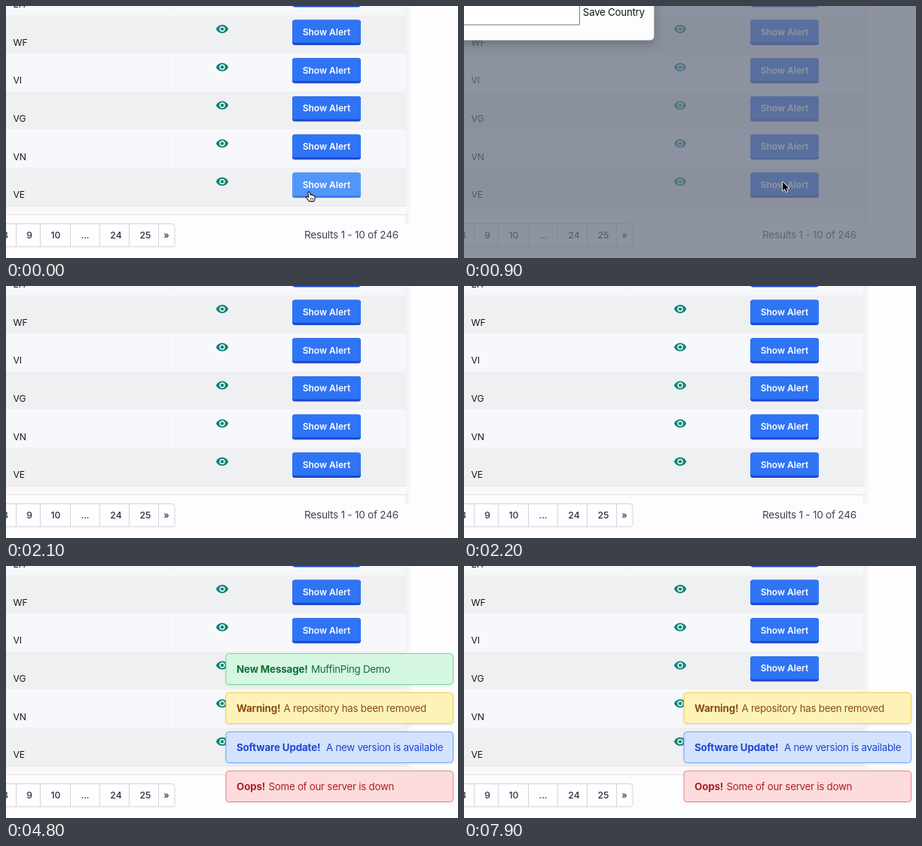
Animation of 600x335 px, one loop 8 s. Source, as an HTML page with a canvas:

```html
<!DOCTYPE html>
<html lang="en">
<head>
<meta charset="utf-8">
<title>Table with alerts</title>
<style>
  html, body { margin: 0; width: 100%; height: 100%; overflow: hidden; background: #fdfcfe; }
  canvas { display: block; width: 600px; height: 335px; }
</style>
</head>
<body>
<canvas id="stage"></canvas>
<script>
const W = 600, H = 335, LOOP = 8000, STEP = 100;
const ROW = 50.7, TABLE_TOP = 12.3;
const canvas = document.getElementById('stage');
const ctx = canvas.getContext('2d');
const ratio = window.devicePixelRatio || 1;
canvas.width = W * ratio;
canvas.height = H * ratio;

const CODES = ['EH', 'WF', 'VI', 'VG', 'VN', 'VE'];
const PAGES = [['8', -1], ['9', 31], ['10', 66], ['...', 105], ['24', 146], ['25', 185], ['»', 213]];
const DIVIDERS = [13.5, 45.5, 85.5, 124.5, 163.5, 202.5];

const ALERTS = [
  { title: 'New Message!', body: 'MuffinPing Demo', x: 405, start: 2400, end: 5900,
    fill: '#d5f7e1', edge: '#6fdc97', ink: '#166b39' },
  { title: 'Warning!', body: 'A repository has been removed', x: 368.5, start: 2600, end: Infinity,
    fill: '#fdf3b9', edge: '#f5cd45', ink: '#8a4d14' },
  { title: 'Software Update!', body: 'A new version is available', x: 425, start: 2800, end: Infinity,
    fill: '#d4e3fd', edge: '#6ca4f5', ink: '#1f46cf' },
  { title: 'Oops!', body: 'Some of our server is down', x: 348.5, start: 4000, end: Infinity,
    fill: '#fcdcdd', edge: '#f48383', ink: '#ae2024' }
];

// Cursor stops: time, x, y
const PATH = [
  [0, 402, 247], [200, 402, 247], [600, 423, 234], [1000, 423, 234],
  [1500, 209, 6], [1800, 209, 6], [2000, 200, -40]
];

const clamp = v => Math.max(0, Math.min(1, v));
const span = (t, from, length) => clamp((t - from) / length);
const easeOut = p => 1 - (1 - p) * (1 - p);
const smooth = p => p * p * (3 - 2 * p);
const mix = (a, b, p) => a + (b - a) * p;

function rect(x, y, w, h, color) {
  ctx.fillStyle = color;
  ctx.fillRect(x, y, w, h);
}

function rounded(x, y, w, h, r, fill, edge) {
  ctx.beginPath();
  ctx.roundRect(x, y, w, h, r);
  if (fill) {
    ctx.fillStyle = fill;
    ctx.fill();
  }
  if (edge) {
    ctx.strokeStyle = edge;
    ctx.lineWidth = 1;
    ctx.stroke();
  }
}

function text(str, x, y, size, color, { weight = 400, align = 'left', gap = 0 } = {}) {
  ctx.font = `${weight} ${size}px Inter, "Open Sans", sans-serif`;
  ctx.letterSpacing = gap + 'px';
  ctx.textAlign = align;
  ctx.fillStyle = color;
  ctx.fillText(str, x, y);
}

function shadow(color, blur, y) {
  ctx.shadowColor = color;
  ctx.shadowBlur = blur * ratio;
  ctx.shadowOffsetY = y * ratio;
}

function clearShadow() {
  shadow('transparent', 0, 0);
}

function dot(x, y, r, color) {
  ctx.beginPath();
  ctx.arc(x, y, r, 0, Math.PI * 2);
  ctx.fillStyle = color;
  ctx.fill();
}

function eye(x, y) {
  ctx.beginPath();
  ctx.moveTo(x - 8.2, y);
  ctx.bezierCurveTo(x - 5, y - 7.4, x + 5, y - 7.4, x + 8.2, y);
  ctx.bezierCurveTo(x + 5, y + 7.4, x - 5, y + 7.4, x - 8.2, y);
  ctx.fillStyle = '#0d8578';
  ctx.fill();
  dot(x, y, 3.7, '#f6f8fa');
  dot(x, y, 2.2, '#0d8578');
}

function button(y, hover) {
  rounded(380, y, 91, 33.5, 3.5, hover ? '#3b7ff0' : '#1c48d3');
  rounded(380, y, 91, 30.5, [3.5, 3.5, 2, 2], hover ? '#5396f9' : '#2f74f4');
  text('Show Alert', 425.5, y + 20.3, 12, '#fff', { weight: 600, align: 'center' });
}

function table(hover) {
  const edge = ctx.createLinearGradient(530, 0, 539, 0);
  edge.addColorStop(0, '#f0f0f4');
  edge.addColorStop(1, '#fdfcfe');
  rect(530, 0, 9, 289, edge);
  rect(0, 266, 532, 11, '#fdf9fb');
  CODES.forEach((code, i) => {
    const y = TABLE_TOP + (i - 1) * ROW;
    rect(0, y, 530, ROW, i % 2 ? '#eff0f2' : '#f7f8fb');
    if (i % 2 === 0) rect(215, y, 1, ROW, '#f0f1f5');
    text(code, 9.5, y + 40.3, 12.2, '#17181c', { gap: -0.1 });
    eye(287, y + 18.3);
    button(y + 6.3, hover && i === CODES.length - 1);
  });
  rect(0, 265.5, 531, 1, '#e5e1e4');
  rect(0, 277, 533, 1, '#e6e3e8');
}

function footer() {
  rounded(-20, 289.5, 244, 30.5, 4, '#fefdff', '#d3d4da');
  DIVIDERS.forEach(x => rect(x - 0.5, 290, 1, 30, '#d3d4da'));
  PAGES.forEach(([label, x]) =>
    text(label, x, 309, 12.2, '#2b303a', { weight: 500, align: 'center' }));
  text('Results 1 - 10 of 246', 396, 309.2, 13.6, '#3d4451', { gap: -0.25 });
}

function dialog(shown) {
  if (shown <= 0) return;
  ctx.save();
  ctx.globalAlpha = shown * 0.75;
  rect(0, 0, W, H, '#686f80');
  ctx.globalAlpha = shown;
  ctx.translate(-40, 5);
  ctx.scale(0.95 + 0.05 * shown, 0.95 + 0.05 * shown);
  ctx.translate(40, -5);
  shadow('rgba(0,0,0,.22)', 14, 5);
  rounded(-340, -200, 592.5, 245.5, 5, '#fff');
  clearShadow();
  rounded(-300, -15.5, 453.5, 40.5, 0, '#fff', '#74767b');
  text('Save Country', 158, 13, 13.3, '#111216', { gap: -0.25 });
  ctx.restore();
}

function alerts(t) {
  let y = 272.5;
  for (const a of [...ALERTS].reverse()) {
    if (t < a.start) continue;
    const out = span(t, a.end, 300);
    if (out < 1) {
      ctx.save();
      ctx.globalAlpha = mix(0.4, 1, span(t, a.start, 150)) * (1 - out);
      ctx.translate(out * 40, 0);
      shadow('rgba(40,40,60,.12)', 4, 1);
      rounded(292, y, 301.5, 41, 4, a.fill);
      clearShadow();
      rounded(292, y, 301.5, 41, 4, null, a.edge);
      text(a.title, 306, y + 25.7, 13.3, a.ink, { weight: 700, gap: -0.12 });
      text(a.body, a.x, y + 25.7, 13.3, a.ink, { gap: -0.25 });
      ctx.restore();
    }
    y -= 52;
  }
}

function polygon(points, fill, edge, width) {
  ctx.beginPath();
  points.forEach(([x, y]) => ctx.lineTo(x, y));
  ctx.closePath();
  ctx.lineJoin = 'round';
  ctx.lineWidth = width;
  ctx.strokeStyle = edge;
  ctx.stroke();
  ctx.fillStyle = fill;
  ctx.fill();
}

function arrow() {
  polygon([[0, 0], [0, 11.5], [2.7, 9.1], [4.5, 13], [6.4, 12.2], [4.7, 8.4], [8.2, 8.2]],
    '#000', '#fff', 1.6);
}

function hand() {
  ctx.beginPath();
  ctx.moveTo(-1.2, 1);
  ctx.quadraticCurveTo(0, -1, 1.4, 1);
  ctx.lineTo(2, 4);
  ctx.quadraticCurveTo(3.3, 3, 4.2, 4.5);
  ctx.quadraticCurveTo(5.5, 3.8, 6.2, 5.3);
  ctx.quadraticCurveTo(8.3, 4.8, 8.2, 7.2);
  ctx.quadraticCurveTo(8.2, 10, 6.8, 12.6);
  ctx.lineTo(0.5, 12.6);
  ctx.quadraticCurveTo(-1.5, 9.5, -4, 7.3);
  ctx.quadraticCurveTo(-3.6, 5.2, -0.3, 7.2);
  ctx.closePath();
  ctx.fillStyle = '#fff';
  ctx.fill();
  ctx.strokeStyle = '#111';
  ctx.lineWidth = 1.1;
  ctx.lineJoin = 'round';
  ctx.stroke();
  ctx.beginPath();
  [2.2, 4, 5.8].forEach(x => {
    ctx.moveTo(x, 8);
    ctx.lineTo(x, 10.8);
  });
  ctx.lineWidth = 0.7;
  ctx.stroke();
}

function cursor(t) {
  if (t >= 2000) return;
  const i = PATH.findIndex(stop => stop[0] > t) - 1;
  const [t0, x0, y0] = PATH[i], [t1, x1, y1] = PATH[i + 1];
  const p = smooth((t - t0) / (t1 - t0));
  ctx.save();
  ctx.translate(mix(x0, x1, p), mix(y0, y1, p));
  if (t >= 1600 && t < 1800) {
    ctx.beginPath();
    ctx.arc(0, 0, 25.3, 0, Math.PI * 2);
    ctx.strokeStyle = '#111';
    ctx.lineWidth = 1.5;
    ctx.stroke();
  }
  if (t < 600 || t >= 1500) hand();
  else arrow();
  ctx.restore();
}

function draw(t) {
  ctx.setTransform(ratio, 0, 0, ratio, 0, 0);
  rect(0, 0, W, H, '#fdfcfe');
  table(t < 600);
  footer();
  dialog(easeOut(span(t, 600, 340)) * (1 - smooth(span(t, 1850, 250))));
  alerts(t);
  cursor(t);
}

const began = performance.now();
function tick() {
  const t = (performance.now() - began) % LOOP;
  draw(Math.floor(t / STEP) * STEP);
  requestAnimationFrame(tick);
}
tick();
</script>
</body>
</html>
```
